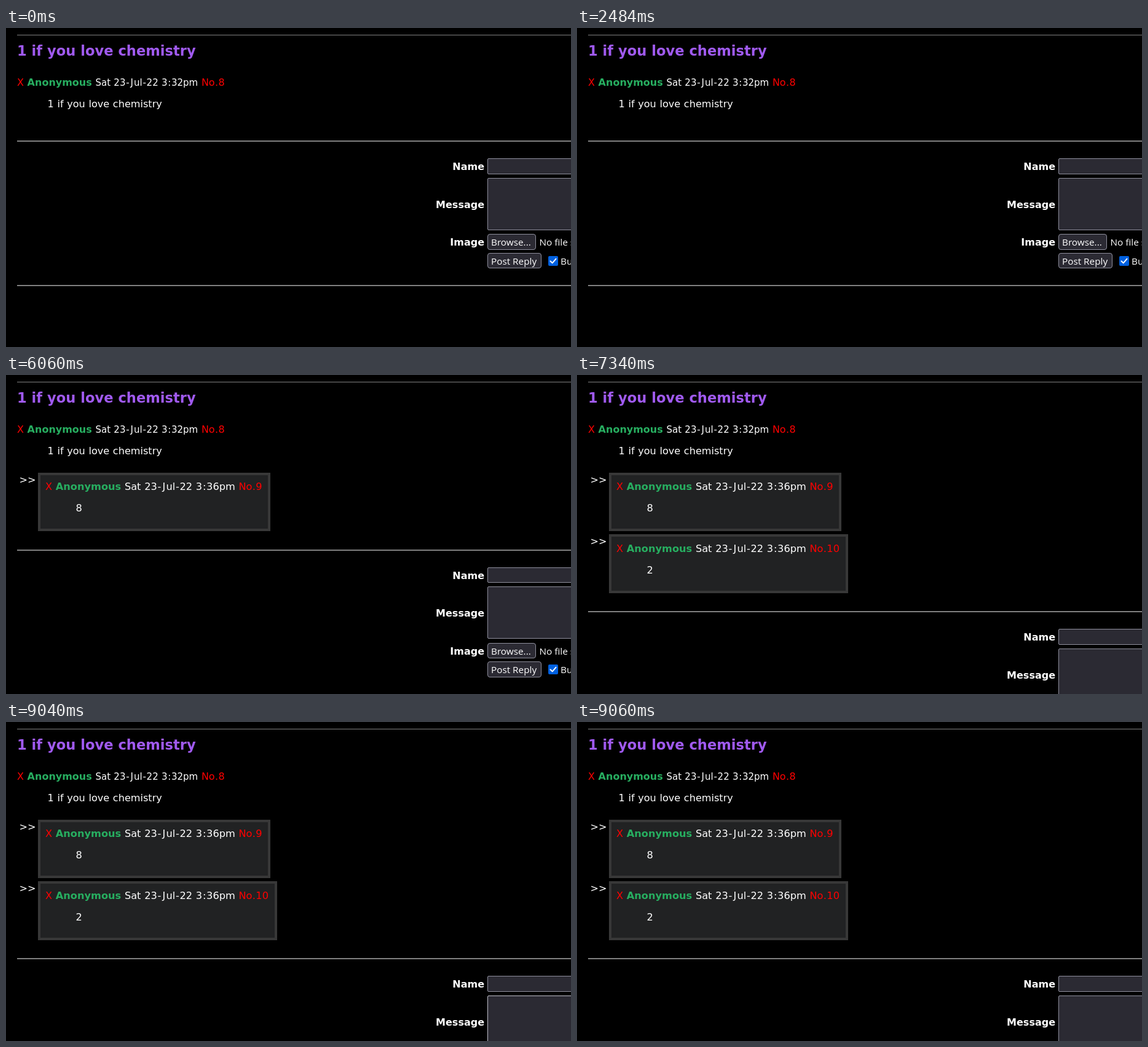
An HTML page for the animation above (9.52 s loop, 919x519 px).

```html
<!DOCTYPE html>
<html lang="en">
<head>
<meta charset="utf-8">
<title>Thread</title>
<style>
  html, body { margin: 0; width: 100%; height: 100%; overflow: hidden; background: #000; }
  body { position: relative; color: #fff; font: 16.2px "DejaVu Sans", sans-serif; word-spacing: .034em; }
  div, hr { position: absolute; box-sizing: border-box; white-space: pre; }
  hr { left: 18px; right: 0; height: 2px; margin: 0; border: solid #808080; border-width: 1px 0; }
  b { word-spacing: 0; }
  i { font-style: normal; padding: 0 .047em; }
  i.wide { padding: 0 .08em; }
  i.slim { padding: 0 .023em; }
  .title { left: 18px; top: 24px; font-size: 22.6px; color: #a05af0; }
  .del, .no { color: #f00; }
  .name { color: #27ae60; }
  .op { left: 18px; top: 79px; font-size: 16px; }
  .op .date { font-size: 15px; }
  .reply { left: 0; width: 100%; height: 100.5px; }
  .box { left: 52px; top: 0; height: 95.2px; background: #212223; border: 4px solid #383838; }
  #replies, #form { left: 0; width: 100%; }
  #replies { top: 0; }
  .label { right: 141px; font-size: 16px; font-weight: bold; word-spacing: 0; }
  .field, .button { left: 783px; background: #2b2a33; border: 1px solid #8f8f9d; }
  .field { width: 200px; border-radius: 2px; }
  .button { border-radius: 4px; }
  .ui { font: 15.3px "Open Sans", "Noto Sans", sans-serif; word-spacing: 0; }
  svg { position: absolute; left: 882px; top: 187.7px; }
</style>
</head>
<body>
<hr style="top:11px;height:1px;border-width:1px 0 0">
<b><div class="title">1 if you love chemistry</div></b>
<div class="op" id="op"></div>
<div style="left:67.5px;top:114px;font-size:16.1px">1 if you love chemistry</div>
<div id="replies"></div>
<div id="form">
  <hr style="top:0">
  <div class="label" style="top:33px">Name</div>
  <div class="field" style="top:29px;height:25.6px"></div>
  <div class="label" style="top:94.6px">Message</div>
  <div class="field" id="message" style="top:60.6px;height:85px"></div>
  <div class="label" style="top:156px">Image</div>
  <div class="button" style="top:152px;width:79px;height:25.6px"></div>
  <div class="ui" style="left:789px;top:155px">Browse...</div>
  <div class="ui" style="left:867.5px;top:155px">No file selected.</div>
  <div class="button" style="top:182.6px;width:88px;height:25.4px"></div>
  <div class="ui" style="left:789px;top:185.6px">Post Reply</div>
  <svg width="16" height="16">
    <rect width="16" height="16" rx="2" fill="#0060df"/>
    <path d="M3.5 8.2 6.7 11.4 12.5 4.6" fill="none" stroke="#fff" stroke-width="2" stroke-linecap="round" stroke-linejoin="round"/>
  </svg>
  <div class="ui" style="left:902px;top:185.6px">Bump</div>
  <hr style="top:235px">
</div>
<script>
const LOOP = 9520, REPLY_TIMES = [4140, 7340], HOVER = [9040, 9060];
const PITCH = 100.5, REPLY_TOP = 158.9, FORM_TOP = 183.3;
const $ = id => document.getElementById(id);

// Give narrow characters a little air.
const AIR = { J: 'wide', '.': 'slim' };
const airy = text => text.replace(/[-:J.]/g, c => `<i class="${AIR[c] || ''}">${c}</i>`);

const header = (time, no) =>
  `<span class="del">X</span> <b class="name">Anonymous</b> ` +
  `<span class="date">${airy('Sat 23-Jul-22 ' + time)}</span> <span class="no">${airy('No.' + no)}</span>`;

const reply = (index, no, text, width) =>
  `<div class="reply" style="top:${REPLY_TOP + index * PITCH}px">` +
  `<div style="left:21.5px;top:2px">&gt;&gt;</div><div class="box" style="width:${width}px"></div>` +
  `<div style="left:64px;top:13.4px">${header('3:36pm', no)}</div>` +
  `<div style="left:113.5px;top:48.4px">${text}</div></div>`;

$('op').innerHTML = header('3:32pm', 8);
$('replies').innerHTML = reply(0, 9, '8', 378) + reply(1, 10, '2', 389);
const replies = [...$('replies').children];

function draw(now) {
  const t = now % LOOP;
  const count = REPLY_TIMES.filter(time => t >= time).length;
  replies.forEach((el, i) => el.style.display = i < count ? 'block' : 'none');
  $('form').style.top = FORM_TOP + count * PITCH + 'px';
  $('message').style.borderColor = t >= HOVER[0] && t < HOVER[1] ? '#bfbfc9' : '#8f8f9d';
}

const start = performance.now();
function tick() {
  draw(performance.now() - start);
  requestAnimationFrame(tick);
}
tick();
</script>
</body>
</html>
```
